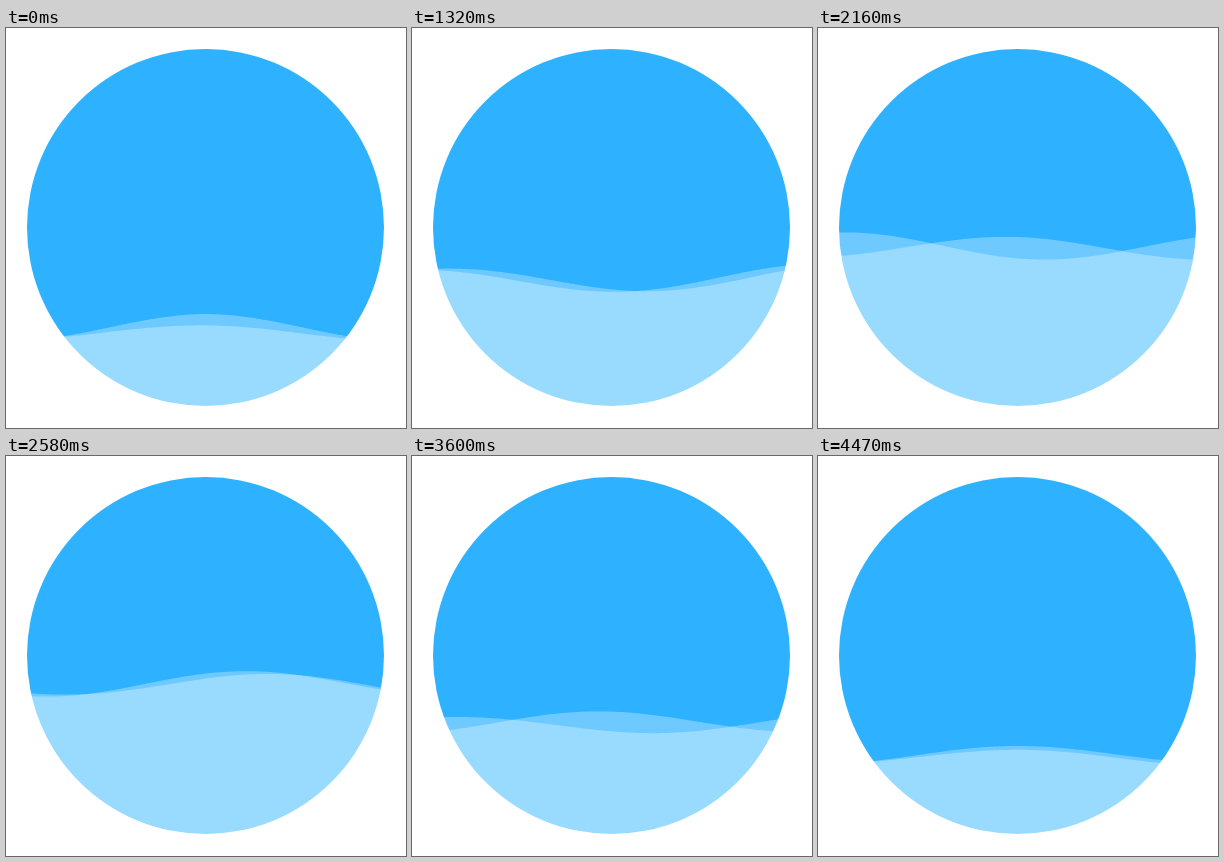
An HTML page with a canvas for the animation above (4500 ms loop, 400 px wide and 400 px high).

```html
<!DOCTYPE html>
<html lang="en">
<head>
<meta charset="utf-8">
<title>Water level</title>
<style>
  html, body { margin: 0; width: 100%; height: 100%; overflow: hidden; background: #fff; }
  canvas { display: block; width: 400px; height: 400px; }
</style>
</head>
<body>
<canvas id="stage" width="400" height="400"></canvas>
<script>
const ctx = document.getElementById('stage').getContext('2d');
const LOOP = 4500, STEP = 30, SIZE = 400;
const WAVELENGTH = 400, HEIGHT = 14;

// Each wave is a fixed ripple sliding sideways. Its crests sit at whole numbers of u,
// are highest at u = peak, and shrink and sink away from there.
const waves = [
  { start: 199, cycles: -2, peak: 0, sink: 1.3 },
  { start: 188, cycles: 5, peak: 2, sink: 2.5 }
];

function surface({ start, cycles, peak, sink }, x, progress) {
  const u = (x - start) / WAVELENGTH + cycles * progress;
  const before = Math.max(0, peak - u);
  const after = Math.max(0, u - peak);
  const height = HEIGHT - 3.2 * before - 1.7 * after;
  return sink * before - height * Math.cos(2 * Math.PI * u);
}

function drawWave(wave, progress) {
  const rise = 1 - Math.abs(1 - 2 * progress);
  const level = 300 - 85 * rise;
  ctx.beginPath();
  ctx.moveTo(0, SIZE);
  for (let x = 0; x <= SIZE; x += 2) ctx.lineTo(x, level + surface(wave, x, progress));
  ctx.lineTo(SIZE, SIZE);
  ctx.fill();
}

function draw(progress) {
  ctx.fillStyle = '#fff';
  ctx.fillRect(0, 0, SIZE, SIZE);
  ctx.fillStyle = '#2eb2ff';
  ctx.beginPath();
  ctx.arc(199.5, 199.5, 178.5, 0, 2 * Math.PI);
  ctx.fill();

  ctx.fillStyle = 'rgba(255, 255, 255, 0.3)';
  for (const wave of waves) drawWave(wave, progress);
}

const begin = performance.now();
function tick() {
  const t = (performance.now() - begin) % LOOP;
  draw(Math.floor(t / STEP) * STEP / LOOP);
  requestAnimationFrame(tick);
}
tick();
</script>
</body>
</html>
```
